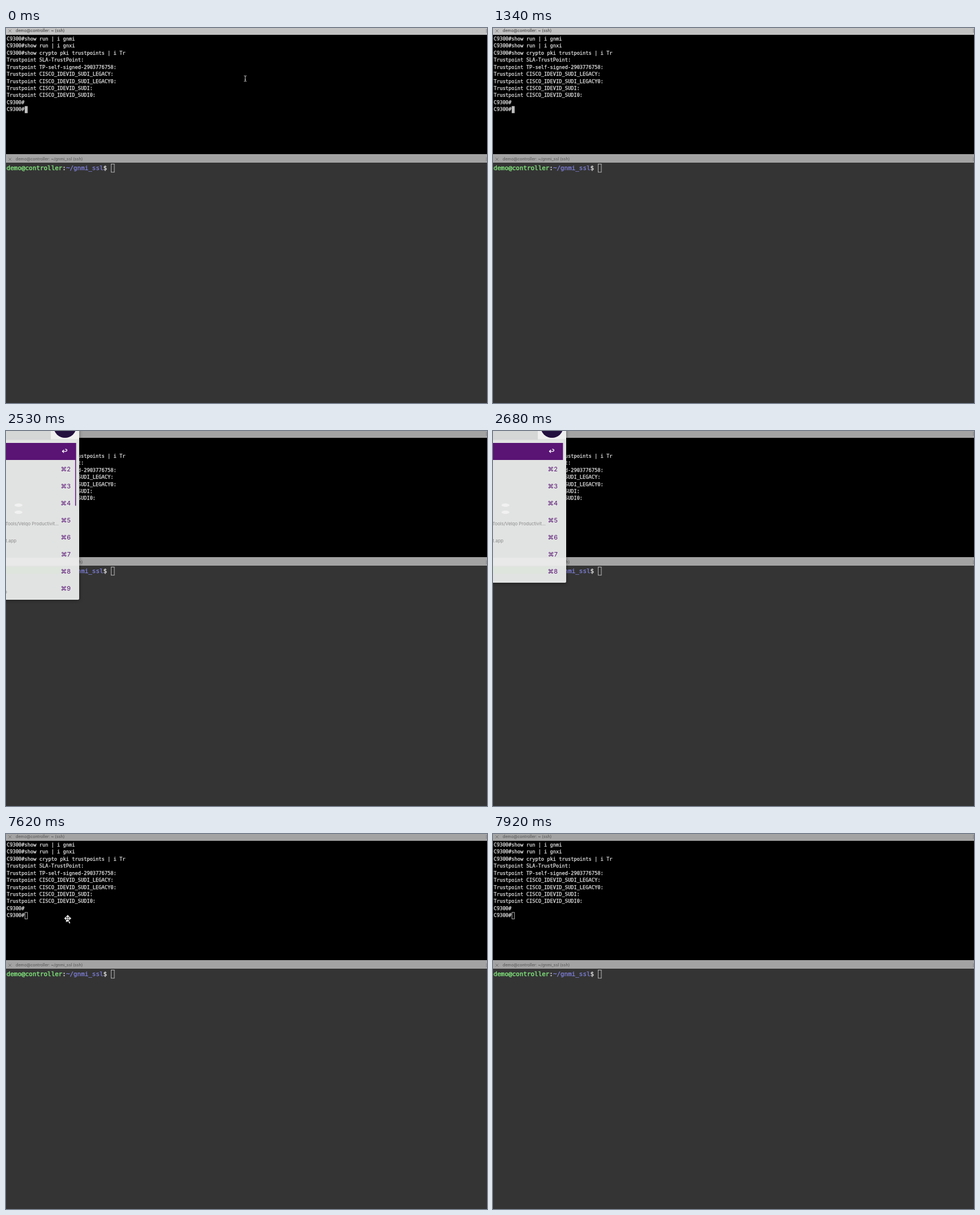
An HTML page that plays this animation: 848x660 px, repeating every 8 s.

```html
<!DOCTYPE html>
<html lang="en">
<head>
<meta charset="utf-8">
<title>Switch terminal session</title>
<style>
  html, body { margin: 0; width: 100%; height: 100%; overflow: hidden; background: #343434; }
  svg { display: block; width: 848px; height: 660px; }
  text { white-space: pre; }
  .mono { font-family: "DejaVu Sans Mono", monospace; stroke-width: .25; }
  .ui { font-family: Inter, "DejaVu Sans", sans-serif; }
  .hollow { fill: none; stroke: #c4c4c4; stroke-width: .9; }
  .plain { fill: #e8e8e8; stroke: #e8e8e8; }
  .host { fill: #7edd79; stroke: #7edd79; stroke-width: .5; }
  .path { fill: #8383e4; stroke: #8383e4; }
  #launcher { filter: drop-shadow(0 1px 3px rgba(0, 0, 0, .4)); }
</style>
</head>
<body>
<svg viewBox="0 0 848 660">
  <defs>
    <g id="close"><path d="M4.5 2.5l5 5m0-5l-5 5" stroke="#686868" stroke-width=".8"/></g>
    <g id="menu"><path d="M846 2.8h2m-2 2.2h2m-2 2.2h2" stroke="#777" stroke-width=".8"/></g>
    <g id="beam"><path d="M-2.2-5Q0-5 0-3.6Q0-5 2.2-5M0-3.6V3.6M-2.2 5Q0 5 0 3.6Q0 5 2.2 5M-1 1.8h2" fill="none" stroke="#ddd" stroke-width=".95"/></g>
    <path id="arrowhead" d="M0-6.3L3.3-2.6H.7V0H-.7V-2.6H-3.3z"/>
  </defs>

  <rect width="848" height="223"/>
  <rect id="topBar" width="848" height="12"/>
  <use href="#close"/><use href="#menu"/>
  <text id="topTitle" class="ui" x="17" y="7.3" font-size="7.2">demo@controller: ~ (ssh)</text>
  <g id="output" class="mono plain" font-size="8.7"></g>
  <rect id="solidCursor" x="33" y="137.5" width="5.2" height="12.3" fill="#bdbdbd"/>
  <rect id="hollowCursor" class="hollow" x="33.4" y="138" width="4.4" height="11.4"/>

  <rect y="222" width="848" height="15" fill="#a3a3a3"/>
  <g transform="translate(0 226)">
    <use href="#close"/><use href="#menu"/>
    <text class="ui" x="17" y="7.3" font-size="7.2" fill="#555">demo@controller: ~/gnmi_ssl (ssh)</text>
  </g>
  <text class="mono plain" x="1" y="250" font-size="10.9"><tspan class="host">demo@controller</tspan>:<tspan class="path">~/gnmi_ssl</tspan>$</text>
  <rect class="hollow" x="185.4" y="239.4" width="5.6" height="14.4"/>

  <g id="launcher">
    <rect id="panel" x="-10" y="-10" width="139" rx="2" fill="#e1e3e2"/>
    <g id="results" class="ui">
      <rect y="223" width="129" height="14" fill="#e8e9e8"/>
      <rect y="239" width="100" height="12" fill="#dde5dc"/>
      <g fill="#f0f1f0">
        <ellipse cx="22" cy="130.5" rx="7" ry="3"/>
        <ellipse cx="22" cy="143" rx="7" ry="3"/>
      </g>
      <rect y="21" width="123.4" height="30" fill="#591474"/>
      <path d="M102 33.2l-2.6 2.6 2.6 2.6M99.6 35.8h5.6q2.2 0 2.2-1.8t-2.2-1.8h-1" fill="none" stroke="#fff" stroke-width="1.3"/>
      <g id="shortcuts" font-size="11" fill="#591474" text-anchor="end"></g>
      <g font-size="8" fill="#8b8b8b" text-anchor="end">
        <text x="93" y="165.5">Tools/Velqo Productivit…</text>
        <text x="18.5" y="195.5">t.app</text>
      </g>
      <g id="overflow">
        <rect x="121.9" y="21" width="1.5" height="110.5" fill="#591474"/>
        <text x="2" y="286" font-size="8" fill="#8b8b8b" text-anchor="end">p</text>
      </g>
    </g>
    <rect width="79" height="15.5" fill="#d5d6d6"/>
    <rect x="79" width="50" height="14" fill="#efefef"/>
    <circle cx="104" cy="-8" r="20" fill="#24103f"/>
  </g>

  <use id="pointer" href="#beam"/>
  <g id="moveIcon" transform="translate(108.8 148.5)" fill="#e8e8e8">
    <use href="#arrowhead"/>
    <use href="#arrowhead" transform="rotate(90)"/>
    <use href="#arrowhead" transform="rotate(180)"/>
    <use href="#arrowhead" transform="rotate(270)"/>
    <path d="M-3 2.5V7L-.5 5zM1.2 5.5l1.8-.6 1.6 3.5-1.8.7z"/>
  </g>
</svg>
<script>
const LOOP = 8000;
const BLUR_AT = 2390, RESULTS_AT = 2530, FILTER_AT = 2680, HIDE_AT = 2830;

// Text pointer appearances: start, end, x, y
const pointerStops = [
  [0, 150, 421.8, 89],
  [150, 290, 417.5, 28.5],
  [1190, 1340, 84.5, 87.5],
  [7770, 7920, 129.5, 145.5]
];

const lines = [
  "C9300#show run | i gnmi",
  "C9300#show run | i gnxi",
  "C9300#show crypto pki trustpoints | i Tr",
  "Trustpoint SLA-TrustPoint:",
  "Trustpoint TP-self-signed-2903776758:",
  "Trustpoint CISCO_IDEVID_SUDI_LEGACY:",
  "Trustpoint CISCO_IDEVID_SUDI_LEGACY0:",
  "Trustpoint CISCO_IDEVID_SUDI:",
  "Trustpoint CISCO_IDEVID_SUDI0:",
  "C9300#",
  "C9300#"
];

const el = id => document.getElementById(id);
const show = (node, visible) => node.setAttribute("display", visible ? "inline" : "none");

function addText(parent, x, y, content) {
  const node = document.createElementNS(parent.namespaceURI, "text");
  node.setAttribute("x", x);
  node.setAttribute("y", y);
  node.textContent = content;
  parent.append(node);
}

lines.forEach((line, i) => addText(el("output"), 1.2, 22 + i * 12.43, line));
for (let n = 2; n <= 9; n++) addText(el("shortcuts"), 114, 10.5 + n * 30.1, "⌘" + n);
const lastShortcut = el("shortcuts").lastChild;

function render(t) {
  const focused = t < BLUR_AT;
  el("topBar").setAttribute("fill", focused ? "#c2c2c2" : "#a3a3a3");
  el("topTitle").setAttribute("fill", focused ? "#333" : "#555");
  show(el("solidCursor"), focused);
  show(el("hollowCursor"), !focused);

  const expanded = t >= RESULTS_AT, filtered = t >= FILTER_AT;
  const bottom = !expanded ? 21 : filtered ? 267 : 297;
  show(el("launcher"), !focused && t < HIDE_AT);
  show(el("results"), expanded);
  show(el("overflow"), !filtered);
  show(lastShortcut, !filtered);
  el("panel").setAttribute("height", bottom + 10);

  const stop = pointerStops.find(([from, to]) => t >= from && t < to);
  show(el("pointer"), stop);
  if (stop) el("pointer").setAttribute("transform", `translate(${stop[2]} ${stop[3]})`);
  show(el("moveIcon"), t >= 7620 && t < 7770);
}

const start = performance.now();
function tick() {
  render((performance.now() - start) % LOOP);
  requestAnimationFrame(tick);
}
tick();
</script>
</body>
</html>
```
